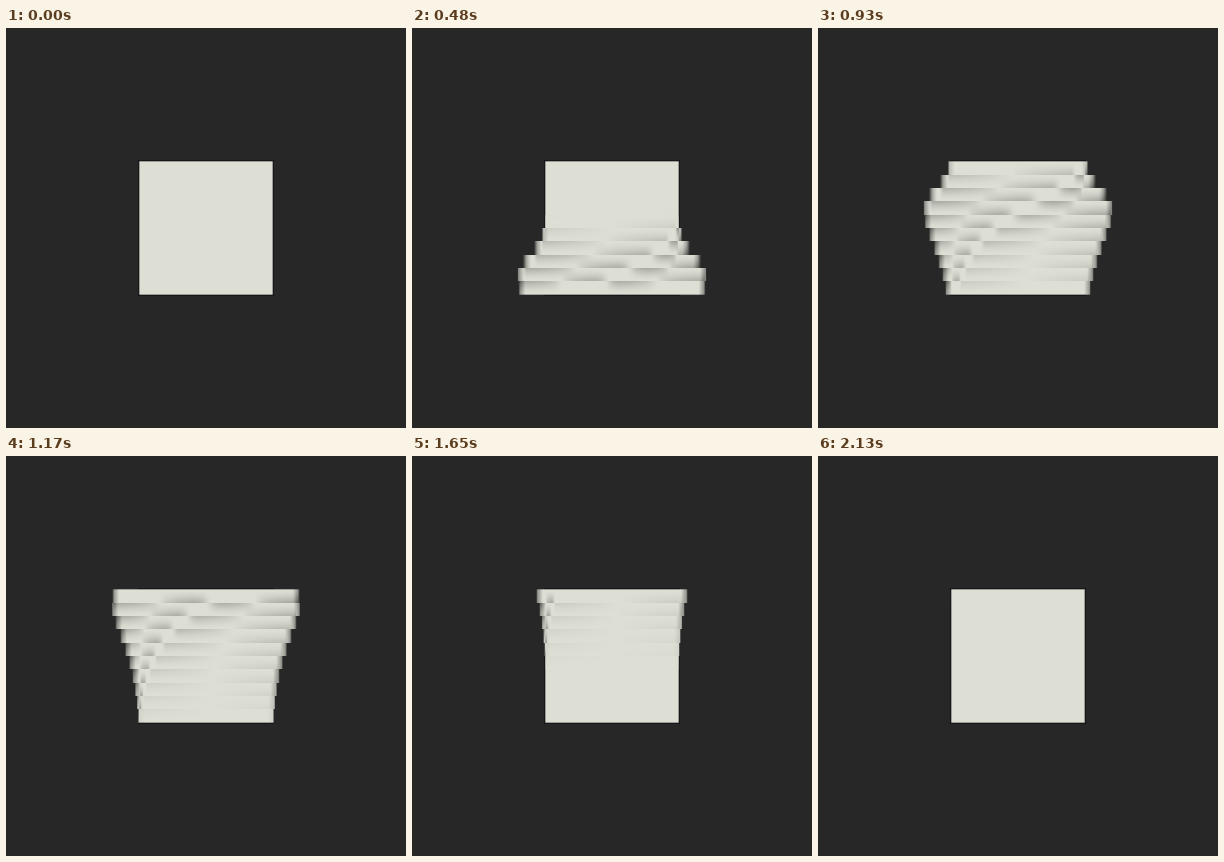
Animation of 400 by 400 pixels, one loop 2700 ms. Source, as an HTML page with a canvas:

```html
<!DOCTYPE html>
<html lang="en">
<head>
<meta charset="utf-8">
<title>Twisting slabs</title>
<style>
  html, body { margin: 0; width: 100%; height: 100%; overflow: hidden; background: #272727; }
  canvas { display: block; width: 400px; height: 400px; }
</style>
</head>
<body>
<canvas id="stage" width="400" height="400"></canvas>
<script>
const ctx = document.getElementById('stage').getContext('2d');
const LOOP = 2700, STEP = 30, SPIN = 1350, DELAY = 90;
const ROWS = 10, SIDE = 400 / 3, ROW_H = SIDE / ROWS, TOP = 200 - SIDE / 2;
const R = SIDE / Math.SQRT2, Q = Math.PI / 4;
const X0 = 104, Y0 = 132, W = 192, H = 136;
const BG = [39, 39, 39], FACE = [221, 222, 212];
const SAMPLES = 4;

const img = ctx.createImageData(W, H);
const light = new Float32Array(W * H);
const cover = new Float32Array(W * H);
const clamp = (v, a = 0, b = 1) => Math.min(b, Math.max(a, v));

// Cubic Bezier easing (.353, 0, .127, 1), solved by bisection
function ease(x) {
  if (x <= 0) return 0;
  if (x >= 1) return 1;
  let lo = 0, hi = 1, s = 0.5;
  for (let i = 0; i < 24; i++) {
    s = (lo + hi) / 2;
    const r = 1 - s;
    const bx = 3 * s * r * r * 0.353 + 3 * s * s * r * 0.127 + s * s * s;
    if (bx < x) lo = s; else hi = s;
  }
  return s * s * (3 - 2 * s);
}

// Front outline of a square slab turned by angle a
function slab(a) {
  const half = R * Math.sin(Q + a);
  const corner = R * Math.sin(Q - a), front = R * Math.cos(Q - a);
  const side = R * Math.cos(Q + a);
  const depth = new Float32Array(W);
  for (let i = 0; i < W; i++) {
    const x = X0 + i + 0.5 - 200;
    if (Math.abs(x) > half) { depth[i] = -1e4; continue; }
    depth[i] = x < corner
      ? side + (front - side) * (x + half) / Math.max(corner + half, 1e-3)
      : front - (front + side) * (x - corner) / Math.max(half - corner, 1e-3);
  }
  return { half, depth };
}

// Shade cast by a neighbour standing d in front, at distance y from the seam
function crease(d, y) {
  if (d <= 0.05) return 0;
  return 0.34 * d / (d + 9) * Math.pow(clamp(1 - y / 13), 1.6);
}

function addSample(t) {
  const slabs = [];
  for (let r = 0; r < ROWS; r++) {
    const u = t - DELAY * (ROWS - 1 - r);
    slabs.push(slab(ease(u / SPIN) * Math.PI / 2));
  }
  for (let j = 0; j < H; j++) {
    const y = Y0 + j;
    const cy = clamp(Math.min(y + 1, TOP + SIDE) - Math.max(y, TOP));
    if (!cy) continue;
    const r = clamp(Math.floor((y + 0.5 - TOP) / ROW_H), 0, ROWS - 1);
    const me = slabs[r], up = slabs[r - 1], down = slabs[r + 1];
    const fromTop = Math.max(0, y + 0.5 - TOP - r * ROW_H);
    const fromEnd = Math.max(0, ROW_H - fromTop);
    const turned = clamp((me.half - SIDE / 2) / 6);
    for (let i = 0; i < W; i++) {
      const x = Math.abs(X0 + i + 0.5 - 200);
      const c = cy * clamp(me.half - x + 0.5);
      if (!c) continue;
      let dark = 0;
      const z = me.depth[i];
      if (z > -1e3) {
        if (up) dark += crease(up.depth[i] - z, fromTop);
        if (down) dark += crease(down.depth[i] - z, fromEnd);
      }
      const rim = clamp(1 - (me.half - x) / 6);
      dark += 0.4 * turned * rim;
      const k = j * W + i;
      cover[k] += c / SAMPLES;
      light[k] += c * (1 - Math.min(dark, 0.6)) / SAMPLES;
    }
  }
}

function draw(t) {
  light.fill(0);
  cover.fill(0);
  for (let s = 0; s < SAMPLES; s++) {
    addSample(t + STEP * ((s + 0.5) / SAMPLES - 0.5));
  }
  const lo = TOP - 1, hi = TOP + SIDE + 1;
  for (let k = 0; k < W * H; k++) {
    const x = X0 + k % W + 0.5, y = Y0 + Math.floor(k / W) + 0.5;
    // thin dark line around the resting block
    const back = x > lo && x < hi && y > lo && y < hi ? 0.6 : 1;
    for (let c = 0; c < 3; c++) {
      img.data[k * 4 + c] = BG[c] * back * (1 - cover[k]) + FACE[c] * light[k];
    }
    img.data[k * 4 + 3] = 255;
  }
  ctx.fillStyle = `rgb(${BG})`;
  ctx.fillRect(0, 0, 400, 400);
  ctx.putImageData(img, X0, Y0);
}

const start = performance.now();
let last = -1;
function tick() {
  const t = (performance.now() - start) % LOOP;
  const shown = Math.min(Math.floor(t / STEP) * STEP, 2130);
  if (shown !== last) draw(last = shown);
  requestAnimationFrame(tick);
}
tick();
</script>
</body>
</html>
```
